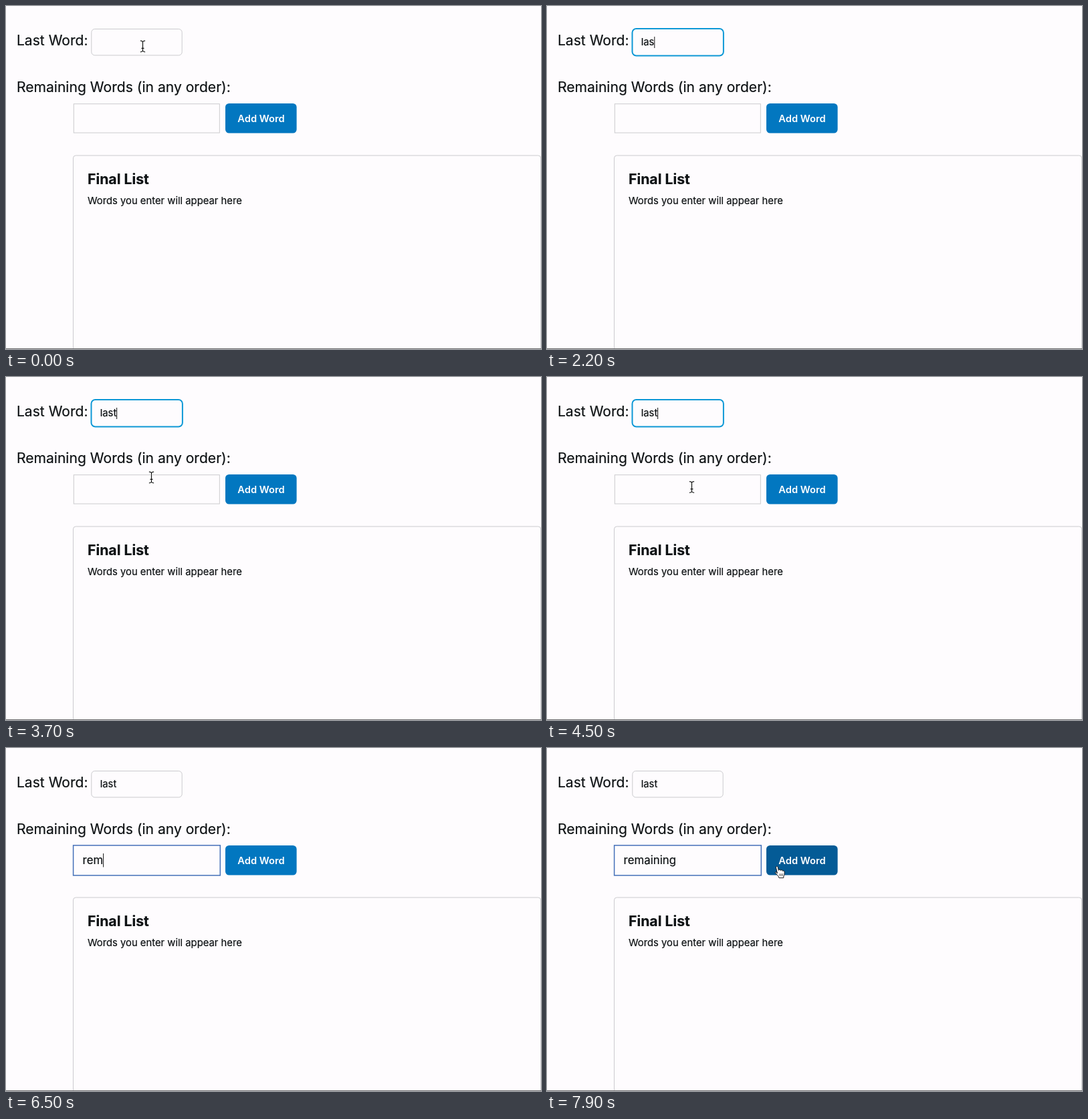
An HTML page for the animation above (8000 ms loop, 800 by 514 pixels).

```html
<!DOCTYPE html>
<html lang="en">
<head>
<meta charset="utf-8">
<title>Word list form</title>
<style>
  html, body { margin: 0; width: 100%; height: 100%; overflow: hidden; background: #fefcfe; }
  svg { display: block; width: 800px; height: 514px; }
  text {
    font-family: Inter, sans-serif; font-optical-sizing: none; white-space: pre;
    fill: #0e1214; stroke: #0e1214; stroke-width: .2;
  }
  .label { font-size: 21.1px; }
  .title { font-size: 21.2px; font-weight: 700; }
  .small { font-size: 14.8px; }
  .entry { font-size: 16.85px; }
  .action { font-size: 14.7px; font-weight: 600; fill: #fff; stroke: none; }
  .box { fill: #fefcfe; stroke: #cbcbce; stroke-width: 1; }
  #ring1 { fill: #fefcfe; stroke: #0d98d6; stroke-width: 2; }
  #ring2 { fill: #fefcfe; stroke: #4470b9; stroke-width: 1.5; }
  #caret { stroke: #111; stroke-width: 1; }
  .halo { fill: none; stroke: #fff; stroke-width: 3; }
  .ink { fill: none; stroke: #111; stroke-width: 1.2; }
</style>
</head>
<body>
<svg viewBox="0 0 800 514">
  <defs>
    <path id="beamShape" d="M-3.6-8.3Q-.6-8.3 0-6.6Q.6-8.3 3.6-8.3M0-6.6V6.6M-3.6 8.3Q-.6 8.3 0 6.6Q.6 8.3 3.6 8.3M-2 2.8H2"/>
  </defs>

  <text class="label" x="15.9" y="59.2">Last Word:</text>
  <rect class="box" x="127.8" y="34.5" width="135.4" height="39.4" rx="5"/>
  <rect id="ring1" x="127.5" y="34" width="136.4" height="40.5" rx="6"/>
  <text id="word1" class="small" x="140.7" y="59.2"></text>

  <text class="label" x="15.9" y="129.2">Remaining Words (in any order):</text>
  <rect class="box" x="101.3" y="146.7" width="218" height="43.3"/>
  <rect id="ring2" x="100.6" y="145.9" width="219.7" height="45"/>
  <text id="word2" class="entry" x="114.6" y="174.1"></text>

  <rect id="button" x="328" y="146" width="106.6" height="44.6" rx="5.5"/>
  <text class="action" x="346.3" y="173.6">Add Word</text>

  <rect class="box" x="100.5" y="224" width="699.2" height="320" rx="4"/>
  <text class="title" x="122" y="266.9">Final List</text>
  <text class="small" x="122" y="296.6">Words you enter will appear here</text>
  <path d="M0 513.5H800" stroke="#6b6b6d"/>

  <path id="caret"/>
  <g id="beam">
    <use href="#beamShape" class="halo"/>
    <use href="#beamShape" class="ink"/>
  </g>
  <g id="hand">
    <g transform="scale(1.06)" stroke="#111" stroke-width=".9">
      <path fill="#fff" stroke-linejoin="round" d="M3.2 10.6L1.4 2.6Q1.1.8 2.4.6Q3.6.5 4 2L5.1 6.4Q5.3 5 6.5 5.2Q7.8 5.2 8 6.6Q8.4 5.6 9.6 5.8Q10.8 6 10.9 7.4Q11.5 6.6 12.5 7Q13.4 7.5 13.3 9L13.2 12Q13 13.5 12.2 14.5L12 17H5.6Q5.2 15 3.5 13.2L.9 10.6Q-.2 9.2.8 8.6Q1.8 8.2 3.2 10.6Z"/>
      <path stroke-width=".7" d="M6.7 11V14.4M8.7 11V14.4M10.7 11V14.4"/>
    </g>
  </g>
</svg>
<script>
  const LOOP = 8000, STEP = 100, BLINK = 500;
  const $ = id => document.getElementById(id);
  const show = (id, on) => $(id).style.display = on ? '' : 'none';

  // Each field: focus span, then one time per typed letter.
  const fields = [
    { n: 1, word: 'last', focus: 400, blur: 4700, keys: [1700, 1900, 2100, 2300], y: 46, h: 17 },
    { n: 2, word: 'remaining', focus: 4700, blur: LOOP, y: 158, h: 20.5,
      keys: [6100, 6300, 6500, 6600, 6700, 6900, 7000, 7100, 7200] }
  ];
  // Pointer stops: time, x, y.
  const stops = [
    [0, 204.5, 60.5], [3200, 204.5, 60.5], [3700, 217.5, 150.5], [4100, 216.5, 165],
    [7300, 216.5, 165], [7700, 312, 186], [7900, 341, 176.6]
  ];

  function pointer(t) {
    const i = stops.findIndex(s => s[0] > t);
    if (i < 0) return stops[stops.length - 1].slice(1);
    const a = stops[i - 1], b = stops[i], k = (t - a[0]) / (b[0] - a[0]);
    return [1, 2].map(j => a[j] + (b[j] - a[j]) * k);
  }

  function drawField(f, t) {
    const text = $('word' + f.n), count = f.keys.filter(k => k <= t).length;
    const active = t >= f.focus && t < f.blur;
    text.textContent = f.word.slice(0, count);
    show('ring' + f.n, active);
    if (!active) return;
    const since = t - (count ? f.keys[count - 1] : f.focus);
    const x = +text.getAttribute('x') + (count ? text.getComputedTextLength() : 0) + .4;
    $('caret').setAttribute('d', `M${x} ${f.y}v${f.h}`);
    show('caret', since % (2 * BLINK) < BLINK);
  }

  function draw(now) {
    const t = Math.floor(now % LOOP / STEP) * STEP;
    show('caret', false);
    fields.forEach(f => drawField(f, t));

    const typing = (t >= 1700 && t < 3300) || (t >= 6100 && t < 7400);
    const over = t >= 7800;
    const [x, y] = pointer(t);
    show('beam', !typing && !over);
    show('hand', over);
    for (const id of ['beam', 'hand']) $(id).setAttribute('transform', `translate(${x} ${y})`);
    $('button').setAttribute('fill', t >= 7900 ? '#045b96' : '#0277c0');
  }

  const start = performance.now();
  function tick() {
    draw(performance.now() - start);
    requestAnimationFrame(tick);
  }
  tick();
</script>
</body>
</html>
```
